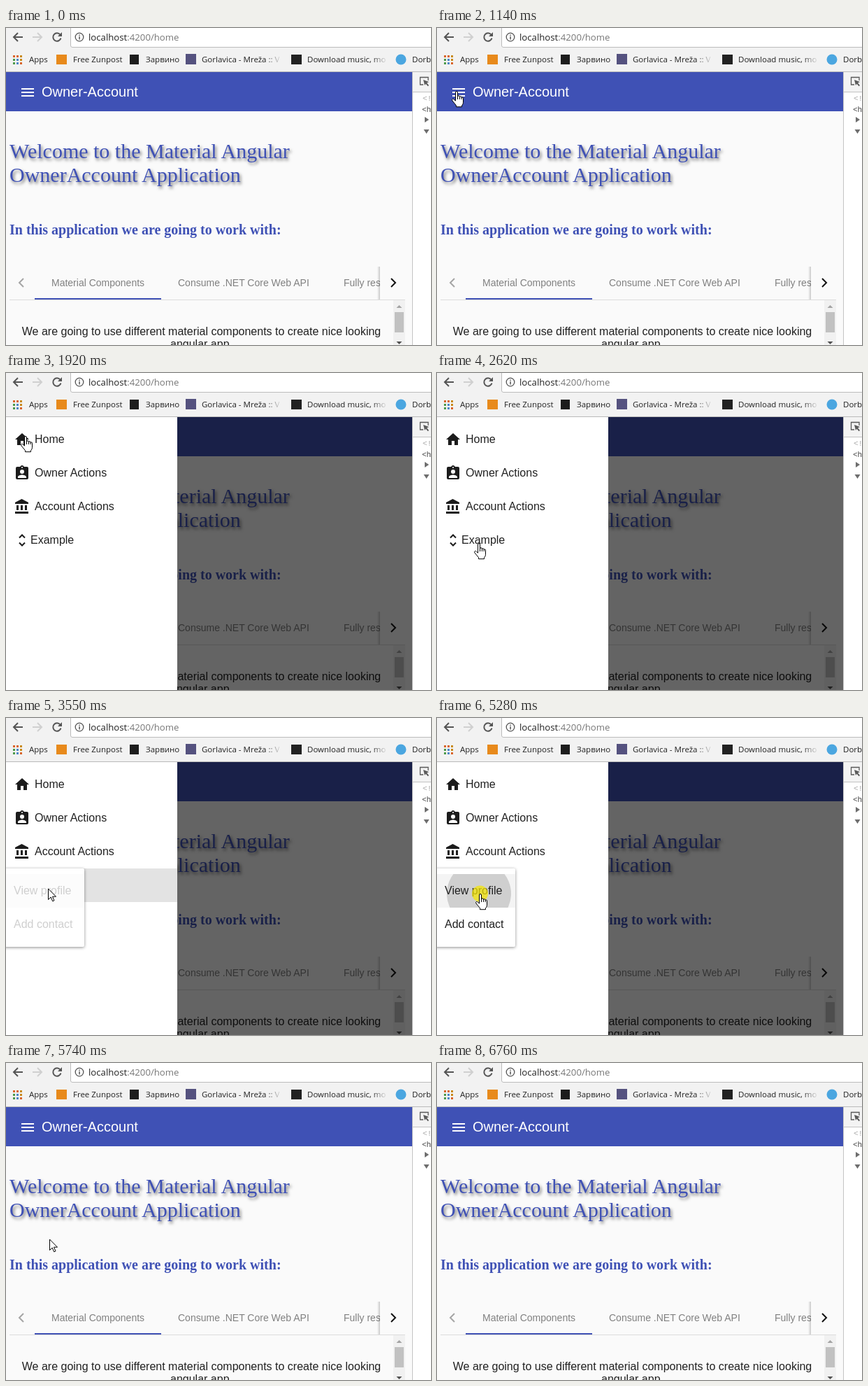
Write an HTML page that moves like this. It is 608 by 453 pixels and loops after 7.23 s.

```html
<!DOCTYPE html>
<html lang="en">
<head>
<meta charset="utf-8">
<title>Drawer navigation</title>
<style>
html, body { margin: 0; width: 100%; height: 100%; overflow: hidden; background: #fafafa; }
svg { display: block; width: 608px; height: 453px; }
text { font-family: "Liberation Sans", Arial, sans-serif; font-size: 16px; fill: #212121; }
.chrome text { font-family: "Open Sans", "Noto Sans", sans-serif; font-size: 11.5px; fill: #222; }
.chrome .url { font-size: 13.2px; }
.title text { font: 30px "Liberation Serif", Times, serif; fill: #3f51b5; }
.title { filter: drop-shadow(2px 3px 2px rgba(0, 0, 0, .55)); }
.sub { font: bold 20px "Liberation Serif", Times, serif; fill: #3f51b5; }
.tabs text { font-size: 14px; fill: #808080; }
.dev text { font: 11px "Liberation Mono", monospace; }
.line { fill: none; stroke-width: 2; }
.panel { filter: drop-shadow(0 1px 2px rgba(0, 0, 0, .45)); }
</style>
</head>
<body>
<svg viewBox="0 0 608 453">
  <defs>
    <linearGradient id="fade">
      <stop offset=".82" stop-color="#222"/>
      <stop offset="1" stop-color="#222" stop-opacity=".1"/>
    </linearGradient>
    <linearGradient id="edge">
      <stop offset="0" stop-opacity="0"/>
      <stop offset="1" stop-opacity=".2"/>
    </linearGradient>
    <clipPath id="page"><path d="M0 63h581v390H0z"/></clipPath>
    <clipPath id="tabClip"><path d="M41 341h494v48H41z"/></clipPath>
    <clipPath id="rowClip"><path d="M0 215h245v48H0z"/></clipPath>
    <clipPath id="itemClip"><path d="M0 223h112v48H0z"/></clipPath>
  </defs>

  <g class="chrome">
    <path fill="#f2f2f2" d="M0 0h608v63H0z"/>
    <path fill="#fff" stroke="#bcbcbc" d="M620 27.5H95q-2.500 0-2.500-2.500V-5H620z"/>
    <path fill="#bababa" d="M0 62h608v1H0z"/>
    <g class="line" stroke="#555">
      <path d="M24 13H11.500M17 7l-6 6 6 6"/>
      <path stroke="#d0d0d0" d="M38 13h12.500M45 7l6 6-6 6"/>
      <path d="M77.500 9.500A5.700 5.700 0 1 0 78.500 14.500"/>
    </g>
    <path fill="#555" d="M80 6v6h-6z"/>
    <circle cx="105" cy="13" r="5.800" fill="none" stroke="#555" stroke-width="1.300"/>
    <path fill="#555" d="M104.300 9.500h1.500v1.500h-1.500zm0 2.500h1.500v4.500h-1.500z"/>
    <text class="url" x="118" y="18">localhost<tspan fill="#777">:4200/home</tspan></text>
    <g id="apps"></g>
    <path fill="#e88a1c" d="M72 38h15v14H72z"/>
    <path fill="#1d1d1d" d="M177 38h13v14h-13z"/>
    <path fill="#55527f" d="M257 37h15v15h-15z"/>
    <path fill="#222" d="M408 38h15v14h-15z"/>
    <circle cx="565" cy="45" r="7.500" fill="#4ba6e0"/>
    <text x="33" y="49">Apps</text>
    <text x="96" y="49">Free Zunpost</text>
    <text x="200" y="49">Зарвино</text>
    <text x="280" y="49" fill="none" style="fill:url(#fade)">Gorlavica - Mreža :: V</text>
    <text x="431" y="49" style="fill:url(#fade)">Download music, mo</text>
    <text x="581" y="49">Dorbe</text>
  </g>

  <g clip-path="url(#page)">
    <path fill="#fafafa" d="M0 63h581v390H0z"/>
    <path fill="#3f51b5" d="M0 63h581v56H0z"/>
    <path fill="#fff" d="M22 86h18v2H22zm0 5h18v2H22zm0 5h18v2H22z"/>
    <text x="51" y="98" style="font-size:20px;fill:#fff">Owner-Account</text>
    <g class="title">
      <text x="5" y="186">Welcome to the Material Angular</text>
      <text x="5" y="220">OwnerAccount Application</text>
    </g>
    <text class="sub" x="5" y="295">In this application we are going to work with:</text>

    <g class="tabs">
      <g clip-path="url(#tabClip)">
        <text x="65" y="369">Material Components</text>
        <text x="246" y="369">Consume .NET Core Web API</text>
        <text x="483" y="369">Fully responsive</text>
      </g>
      <path fill="url(#edge)" d="M531 341h4v47h-4z"/>
      <path fill="#fafafa" d="M535 341h36v47h-36z"/>
      <path fill="#dcdcdc" d="M5 388h566v1H5z"/>
      <path fill="#3f51b5" d="M41 386h181v2H41z"/>
      <path class="line" stroke="#a5a5a5" d="M25 358l-6 6 6 6"/>
      <path class="line" stroke="#111" d="M551 358l6 6-6 6"/>
    </g>
    <text x="279.500" y="439" text-anchor="middle">We are going to use different material components to create nice looking</text>
    <text x="279.500" y="457" text-anchor="middle">angular app.</text>
    <path fill="#f1f1f1" d="M554 389h17v64h-17z"/>
    <path fill="#c1c1c1" d="M556 406h13v29h-13z"/>
    <path fill="#a3a3a3" d="M558.500 400h8l-4-4z"/>
    <path fill="#505050" d="M558.500 448h8l-4 4z"/>

    <path id="shade" d="M0 63h581v390H0z"/>

    <g id="drawer">
      <path fill="#fff" d="M0 63h245v390H0z"/>
      <circle id="rowRipple" cx="60" cy="243" fill="#e3e3e3" clip-path="url(#rowClip)"/>
      <g fill="#1c1c1c">
        <path transform="translate(11 83)" d="M10 20v-6h4v6h5v-8h3L12 3 2 12h3v8z"/>
        <path transform="translate(11 131)" d="M19 3h-4.180a3 3 0 0 0-5.640 0H5a2 2 0 0 0-2 2v14a2 2 0 0 0 2 2h14a2 2 0 0 0 2-2V5a2 2 0 0 0-2-2zM12 3a1 1 0 1 1 0 2 1 1 0 0 1 0-2zm0 4a3 3 0 1 1 0 6 3 3 0 0 1 0-6zm6 12H6v-1.400c0-2 4-3.100 6-3.100s6 1.100 6 3.100z"/>
        <path transform="translate(11 179)" d="M4 10v7h3v-7zm6 0v7h3v-7zM2 22h19v-3H2zm14-12v7h3v-7zM11.500 1L2 6v2h19V6z"/>
      </g>
      <path class="line" stroke="#1c1c1c" d="M19 235.500l4-4 4 4M19 242.500l4 4 4-4"/>
      <text x="41" y="100">Home</text>
      <text x="41" y="148">Owner Actions</text>
      <text x="41" y="196">Account Actions</text>
      <text x="35" y="244">Example</text>
    </g>

    <g id="menu">
      <path class="panel" fill="#fff" d="M-3 215h113q2 0 2 2v108q0 2-2 2H-3z"/>
      <g id="items">
        <rect id="hover" width="112" height="48" fill="#f4f4f4"/>
        <circle id="itemRipple" cx="60" cy="251" fill="#cfcfcf" clip-path="url(#itemClip)"/>
        <text x="11" y="252">View profile</text>
        <text x="11" y="300">Add contact</text>
      </g>
    </g>
  </g>

  <g class="dev">
    <path fill="#fff" d="M581 63h27v390h-27z"/>
    <path fill="#f3f3f3" d="M582 63h26v28h-26z"/>
    <path fill="#c4c4c4" d="M581 63h1v390h-1zM582 91h26v1h-26z"/>
    <path fill="none" stroke="#5a5a5a" stroke-width="1.300" d="M597 81h-4.500V70.500H604V75"/>
    <path fill="#5a5a5a" d="M597 74l8 3-3 1.500 3 3.500-1.500 1.300-3-3.600L599 82z"/>
    <text x="596" y="104" style="fill:#aaa">&lt;!</text>
    <text x="595" y="120" style="fill:#444">&lt;h</text>
    <path fill="#6e6e6e" d="M599 127l6 4-6 4zM597.500 145h8l-4 6z"/>
  </g>

  <g id="cursor">
    <circle id="click" cx="-.5" r="11.500" fill="#f5e600" opacity=".72"/>
    <path id="arrow" fill="#fff" stroke="#000" d="M.5 1v15.500l3.700-3.500 2.500 5.800 2.300-1-2.500-5.600h5z"/>
    <g id="hand" transform="translate(-7 0)" stroke="#000">
      <path fill="#fff" d="M5.500 12V2q0-1.500 1.500-1.500T8.500 2v6q0-1.200 1.400-1.200t1.500 1.200v1q0-1.200 1.400-1.200t1.400 1.200v1q0-1 1.200-1t1.100 1.200v6q0 3-2 4.500v2h-8v-2L1 14q-1-1.800.2-2.400t2.300.6l2 2z"/>
      <path fill="none" d="M8.500 8v4M11.400 9v3M14.200 10v2"/>
    </g>
  </g>
</svg>

<script>
const LOOP = 7230;
const $ = id => document.getElementById(id);
const set = (id, attrs) => {
  for (const k in attrs) $(id).setAttribute(k, attrs[k]);
};
const clamp = v => Math.max(0, Math.min(1, v));
const ramp = (t, from, to) => clamp((t - from) / (to - from));
const within = (t, from, to) => t >= from && t < to;

// bursts of motion: start, end, number of steps
const bursts = [
  [350, 440, 2], [590, 1140, 8], [1290, 2000, 10], [2070, 2620, 8],
  [3150, 3780, 9], [4100, 4250, 3], [4570, 4950, 6], [5180, 5180, 1],
  [5280, 5740, 7], [5970, 6050, 2], [6680, 6760, 2]
];

function snap(t) {
  let result = 0;
  for (const [start, end, n] of bursts) {
    const late = t + 5 - start;
    if (late < 0) break;
    const step = (end - start) / (n - 1) || 1;
    result = start + Math.min(n - 1, Math.floor(late / step)) * step;
  }
  return result;
}

// cubic-bezier(.25, .8, .25, 1)
function ease(x) {
  let lo = 0, hi = 1, s = .5;
  for (let i = 0; i < 24; i++) {
    s = (lo + hi) / 2;
    if (.75 * s * (1 - s) + s ** 3 < x) lo = s; else hi = s;
  }
  return 2.4 * (1 - s) ** 2 * s + 3 * (1 - s) * s * s + s ** 3;
}

const NONE = 0, ARROW = 1, HAND = 2;
const path = [
  [0, 0, 0, NONE],
  [350, 70, 415, ARROW], [440, 0, 0, NONE],
  [589, 8, 210, ARROW], [830, 14, 140, ARROW], [1010, 24, 100, HAND],
  [1139, 28, 90, HAND], [2000, 28, 90, HAND], [2230, 90, 150, HAND],
  [2390, 143, 215, HAND], [2540, 80, 256, HAND], [2619, 60, 243, HAND],
  [3470, 60, 243, ARROW], [4020, 60, 243, ARROW], [4175, 59, 275, HAND],
  [4249, 59, 287, HAND], [4490, 59, 287, HAND], [4949, 62, 251, HAND],
  [5590, 62, 251, ARROW], [5960, 62, 251, ARROW], [5969, 89, 338, ARROW],
  [6049, 0, 0, NONE], [6680, 518, 449, ARROW], [6759, 0, 0, NONE]
];

function pointer(t) {
  let i = path.length - 1;
  while (path[i][0] > t) i--;
  const [t0, x, y, kind] = path[i];
  const next = path[i + 1];
  if (!kind || !next || !next[3]) return { x, y, kind };
  const k = (t - t0) / (next[0] - t0);
  return { x: x + (next[1] - x) * k, y: y + (next[2] - y) * k, kind };
}

function draw(t) {
  const open = ease(ramp(t, 1496, 1896)) * (1 - ease(ramp(t, 5311, 5711)));
  set("drawer", { transform: `translate(${Math.round(245 * (open - 1))} 0)` });
  set("shade", { opacity: .6 * open });

  set("rowRipple", {
    r: 190 * ramp(t, 3220, 3540),
    opacity: 1 - ramp(t, 3560, 3770)
  });

  const grow = ramp(t, 3400, 3540);
  set("menu", {
    transform: `translate(0 215) scale(${grow}) translate(0 -215)`,
    opacity: grow * (1 - ramp(t, 5370, 5510))
  });
  set("items", { opacity: ramp(t, 3485, 3760) });

  const p = pointer(t);
  set("hover", { y: p.y < 271 ? 223 : 271 });
  set("itemRipple", {
    r: .46 * Math.max(0, t - 5180),
    opacity: 1 - ramp(t, 5300, 5430)
  });

  const down = within(t, 1285, 1500) || within(t, 3220, 3400) || within(t, 5175, 5340);
  set("cursor", { transform: `translate(${Math.round(p.x)} ${Math.round(p.y)})` });
  set("click", { visibility: down ? "visible" : "hidden" });
  set("arrow", { visibility: p.kind === ARROW ? "visible" : "hidden" });
  set("hand", { visibility: p.kind === HAND ? "visible" : "hidden" });
}

const dots = ["#d9652b", "#d9652b", "#c98a1e", "#4d9a4a", "#4f86c6", "#c98a1e", "#4d9a4a", "#4f86c6", "#d9652b"];
$("apps").innerHTML = dots.map((c, i) =>
  `<rect x="${10 + i % 3 * 5}" y="${39 + Math.floor(i / 3) * 5}" width="3" height="3" fill="${c}"/>`).join("");

const begin = performance.now();
function tick() {
  draw(snap((performance.now() - begin) % LOOP));
  requestAnimationFrame(tick);
}
tick();
</script>
</body>
</html>
```
